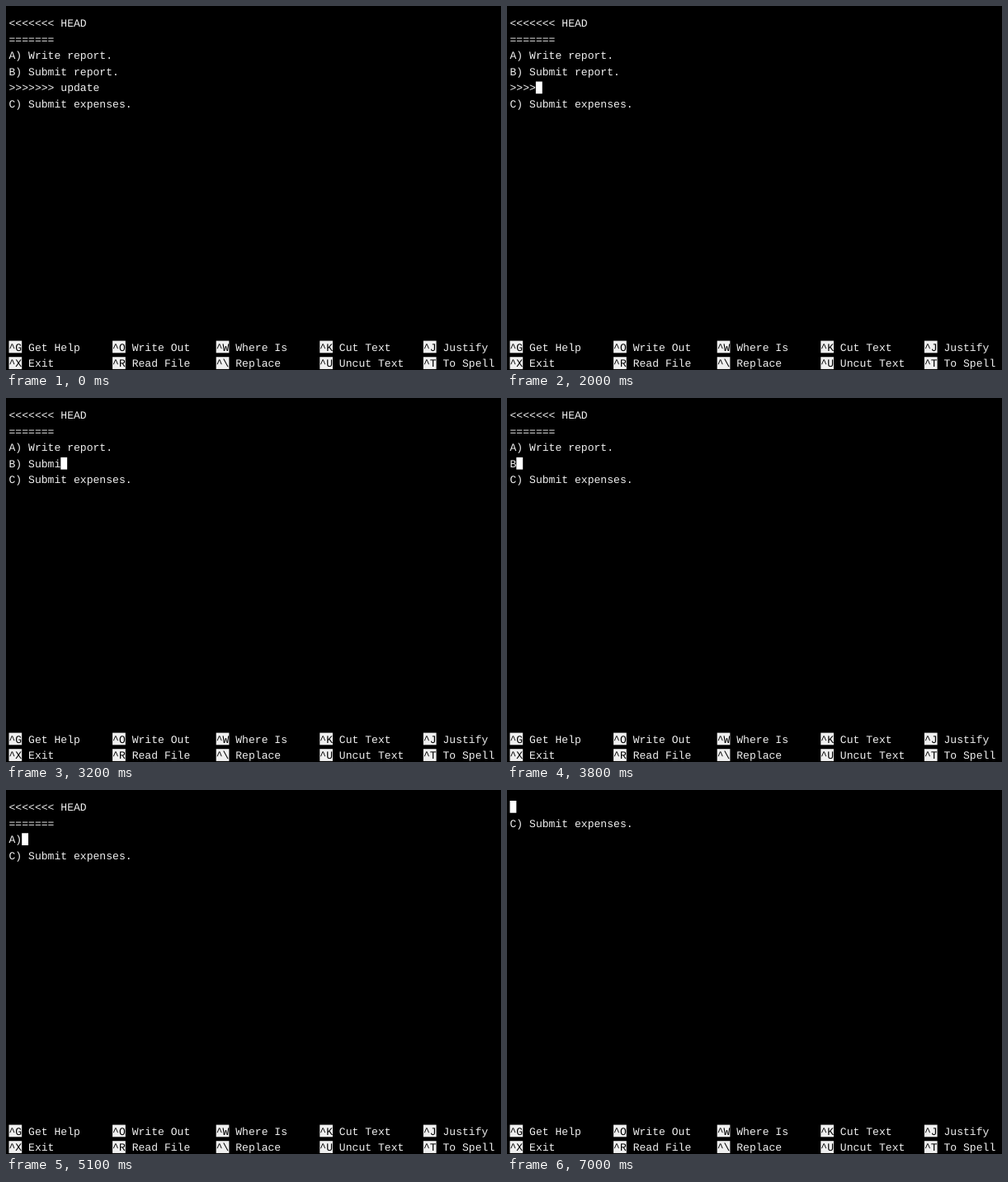
An HTML page with a canvas that plays this animation: 600x441 px, repeating every 8 s.

```html
<!DOCTYPE html>
<html lang="en">
<head>
<meta charset="utf-8">
<title>Terminal editor</title>
<style>
  html, body { margin: 0; width: 100%; height: 100%; overflow: hidden; background: #000; }
  canvas { display: block; }
</style>
</head>
<body>
<canvas id="stage" width="600" height="441"></canvas>
<script>
const ctx = document.getElementById('stage').getContext('2d');

const LOOP = 8000;
const SIZE = 13.08;
const LEFT = 3.5, TOP = 13;
const CELL = 7.85, PITCH = 19.63, BOX = 14.7;
const BASE = 11.9;
const INK = '#f0f0f0';

const HEAD = '<<<<<<< HEAD\n=======\nA) Write report.\nB) Submit report.\n>>>>>>> update';
const TAIL = 'C) Submit expenses.';
const MENU = [
  ['^G Get Help', '^O Write Out', '^W Where Is', '^K Cut Text', '^J Justify'],
  ['^X Exit', '^R Read File', '^\\ Replace', '^U Uncut Text', '^T To Spell']
];
const MENU_ROW = 20, MENU_COLS = 16;

const cellX = col => LEFT + col * CELL;
const rowY = row => TOP + row * PITCH;

function text(str, col, row, color = INK) {
  ctx.fillStyle = color;
  ctx.fillText(str, cellX(col), rowY(row) + BASE);
}

function block(col, row, cells, color) {
  ctx.fillStyle = color;
  ctx.fillRect(cellX(col), rowY(row), cells * CELL, BOX);
}

// Backspace: one tap, then a held key repeating 12 times a second, shown every 100 ms.
function deleted(t) {
  if (t < 800) return 0;
  if (t < 1400) return 1;
  const step = Math.floor((t - 1400) / 100);
  return Math.min(HEAD.length, 3 + Math.floor(step * 1.2 + 0.05));
}

function drawMenu() {
  MENU.forEach((items, r) => items.forEach((item, i) => {
    const col = i * MENU_COLS, row = MENU_ROW + r;
    block(col, row, 2, INK);
    text(item.slice(0, 2), col, row, '#000');
    text(item.slice(3), col + 3, row);
  }));
}

function draw(t) {
  ctx.fillStyle = '#000';
  ctx.fillRect(0, 0, 600, 441);
  ctx.font = `${SIZE}px "Liberation Mono", "Courier New", monospace`;
  ctx.textRendering = 'geometricPrecision';

  const lines = HEAD.slice(0, HEAD.length - deleted(t)).split('\n');
  const last = lines.length - 1;
  lines.forEach((line, row) => text(line, 0, row));
  text(TAIL, 0, last + 1);
  if (t >= 300) block(lines[last].length, last, 1, '#fff');
  drawMenu();
}

const start = performance.now();
function tick() {
  draw((performance.now() - start) % LOOP);
  requestAnimationFrame(tick);
}
tick();
</script>
</body>
</html>
```
